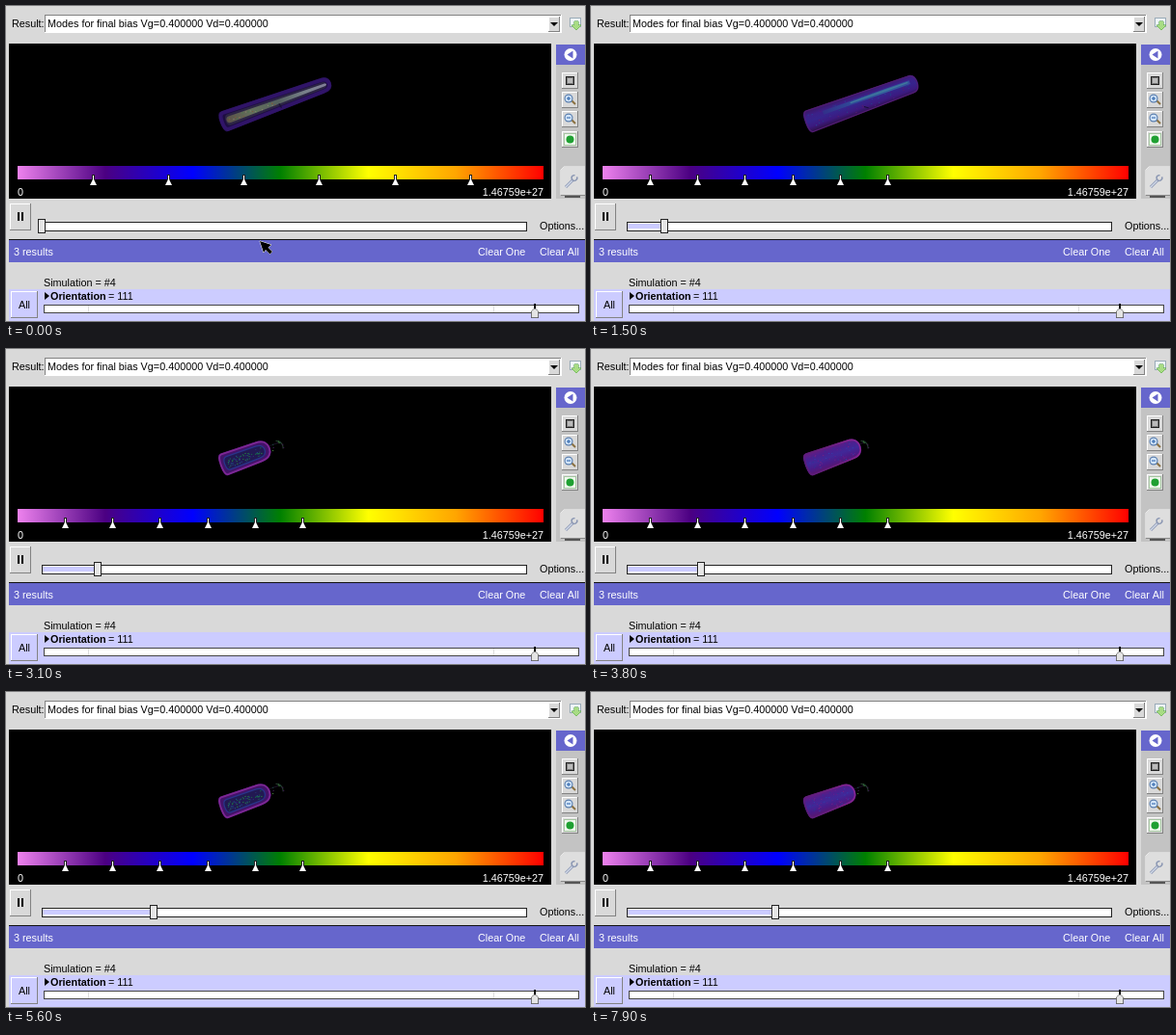
Animation of 600x327 px, one loop 8000 ms. Source, as an HTML page with a canvas:

```html
<!DOCTYPE html>
<html lang="en">
<head>
<meta charset="utf-8">
<title>Simulation viewer</title>
<style>
html, body { margin: 0; width: 100%; height: 100%; overflow: hidden; background: #d9d9d9; }
canvas { display: block; width: 600px; height: 327px; }
</style>
</head>
<body>
<canvas id="stage" width="600" height="327"></canvas>
<script>
const c = document.getElementById('stage').getContext('2d');
const LOOP = 8000;
const GREY = '#d9d9d9', BLUE = '#6666cc', PALE = '#ccccff';
const RAINBOW = ['#ee82ee', '#4b0082', '#0000ff', '#008000', '#ffff00', '#ffa500', '#ff0000'];

// Playback steps: start time, slider position, volume look, volume length
const STEPS = [
  [0, 36, 'glow', 121], [100, 36, 'tube', 123], [800, 55, 'tube', 123], [1500, 75, 'tube', 123],
  [2500, 94, 'ring', 54], [3300, 113, 'solid', 60], [4300, 133, 'tube', 123],
  [5300, 152, 'ring', 54], [6300, 172, 'ring', 54], [7200, 190, 'solid', 54]
];

function rect(x, y, w, h, fill) {
  c.fillStyle = fill;
  c.fillRect(x, y, w, h);
}

function frame(x, y, w, h, line) {
  c.strokeStyle = line;
  c.lineWidth = 1;
  c.strokeRect(x + .5, y + .5, w - 1, h - 1);
}

function box(x, y, w, h, fill, line) {
  rect(x, y, w, h, fill);
  frame(x, y, w, h, line);
}

function raised(x, y, w, h, fill = GREY) {
  rect(x, y, w, h, '#828282');
  rect(x, y, w - 1, h - 1, '#fff');
  rect(x + 1, y + 1, w - 2, h - 2, fill);
}

function poly(points, fill, line) {
  c.beginPath();
  for (let i = 0; i < points.length; i += 2) c.lineTo(points[i], points[i + 1]);
  c.closePath();
  if (line) { c.strokeStyle = line; c.lineWidth = 1; c.stroke(); }
  c.fillStyle = fill;
  c.fill();
}

function disc(x, y, r, fill) {
  c.beginPath();
  c.arc(x, y, r, 0, 7);
  c.fillStyle = fill;
  c.fill();
}

function line(x1, y1, x2, y2, color, width = 1) {
  c.beginPath();
  c.moveTo(x1, y1);
  c.lineTo(x2, y2);
  c.strokeStyle = color;
  c.lineWidth = width;
  c.stroke();
}

function text(s, x, y, color = '#000', align = 'left', weight = '') {
  c.font = weight + ' 10.8px "Liberation Sans", Arial, sans-serif';
  c.textAlign = align;
  c.fillStyle = color;
  c.fillText(s, x, y);
}

function ramp(x1, y1, x2, y2, colors) {
  const g = c.createLinearGradient(x1, y1, x2, y2);
  colors.forEach((col, i) => g.addColorStop(i / (colors.length - 1), col));
  return g;
}

function random(seed) {
  return () => (seed = seed * 16807 % 2147483647) / 2147483647;
}

function specks(n, seed, x, w, h, colors) {
  const rnd = random(seed);
  for (let i = 0; i < n; i++) {
    rect(x + rnd() * w, (rnd() - .5) * h, 1.3, 1, colors[i % colors.length]);
  }
}

// Rod along the local x axis; a is the left and b the right half-width
function rod(x, len, a, b, nose) {
  c.beginPath();
  c.moveTo(x + 3, -a);
  c.lineTo(len - nose, -b);
  c.bezierCurveTo(len - nose / 4, -b, len, -b / 2, len, 0);
  c.bezierCurveTo(len, b / 2, len - nose / 4, b, len - nose, b);
  c.lineTo(x + 3, a);
  c.quadraticCurveTo(x - 1, a, x - 1, 0);
  c.quadraticCurveTo(x - 1, -a, x + 3, -a);
  c.closePath();
}

function fillRod(fill, ...shape) {
  rod(...shape);
  c.fillStyle = fill;
  c.fill();
}

function strokeRod(color, width, ...shape) {
  rod(...shape);
  c.strokeStyle = color;
  c.lineWidth = width;
  c.stroke();
}

// Faint remains of the far end beside the short body
function farEnd() {
  line(54, -2, 64, -2, '#1c1026');
  c.beginPath();
  c.arc(60, 2, 7, -1.3, .5);
  c.strokeStyle = '#263a2c';
  c.lineWidth = 1.2;
  c.stroke();
  specks(9, 37, 55, 12, 9, ['#3f7a35', '#3a1a50', '#174a3c']);
}

const LOOKS = {
  glow(len) {
    fillRod('#1d0d42', 0, len, 11, 8, 8);
    strokeRod('#301468', 4, 2, len - 2, 9, 6, 8);
    fillRod('#2d2546', 6, len - 5, 6, 3.5, 5);
    fillRod(ramp(5, 0, len, 0, ['#5a5048', '#64705c', '#55615f', '#78808a', '#857f9c']), 7, len - 5, 3.5, 1.3, 3);
    specks(26, 11, 8, 50, 5, ['#7c5a3c', '#4b7a50', '#8a8470']);
    line(63, 2, 64, 7, '#1a1030');
  },
  tube(len) {
    fillRod(ramp(0, -11, 0, 11, ['#3c1868', '#3c2088', '#36248c', '#3c1a80', '#30104c']), 0, len, 12, 9.5, 7);
    strokeRod('#541d74', 1, 1, len - 1, 11.3, 9, 7);
    specks(60, 23, 4, len - 14, 15, ['#2a4098', '#4c1b80', '#283c88', '#5a1c6c']);
    line(20, -3.5, len - 8, -2.5, ramp(20, 0, len, 0, ['#32308a', '#2f4c98', '#34629c', '#35489c']), 4);
    line(50, -3.5, len - 10, -3, '#407a9c', 1.2);
    line(62, 5, 66, 8, '#171032');
  },
  solid(len) {
    farEnd();
    fillRod(ramp(0, -11, 0, 11, ['#641b80', '#4a2090', '#402898', '#4a1b88', '#5a1670']), 0, len, 12, 10.5, 11);
    strokeRod(ramp(0, 0, len, 0, ['#5c1c78', '#6b217f', '#8a2494']), 1.6, 1, len - 1, 11.3, 9.7, 11);
    specks(50, 41, 4, len - 12, 17, ['#353ca8', '#641d8c', '#303494', '#722286']);
  },
  ring(len) {
    farEnd();
    fillRod('#431369', 0, len, 12, 11, 12);
    strokeRod('#7d2794', 1.8, 1, len - 1, 11, 10, 12);
    fillRod('#221952', 5, len - 6, 7, 6.5, 8);
    strokeRod('#28358a', 1.3, 5, len - 6, 7, 6.5, 8);
    specks(65, 53, 7, len - 16, 9, ['#19694a', '#205086', '#248044', '#283070']);
  }
};

function volume(t, i) {
  const [start, , look, len] = STEPS[i];
  const [, , oldLook, oldLen] = STEPS[Math.max(0, i - 1)];
  const same = look === oldLook && len === oldLen;
  const mix = same ? 1 : Math.min(1, (t - start + 100) / 400);
  c.save();
  c.beginPath();
  c.rect(4, 40, 561, 125);
  c.clip();
  c.translate(223, 121);
  c.rotate(-.35);
  if (mix < 1) {
    c.globalAlpha = 1 - mix;
    LOOKS[oldLook](oldLen);
  }
  c.globalAlpha = mix;
  LOOKS[look](len);
  c.restore();
}

function legend(t) {
  rect(12, 166, 545, 14, ramp(12, 0, 557, 0, RAINBOW));
  const gap = t < 300 ? 78.2 : 49.3;
  for (let i = 1; i < 7; i++) {
    const x = Math.floor(12 + i * gap);
    rect(x - 1, 175, 3, 6, '#222');
    rect(x, 176, 1, 6, '#fff');
    poly([x + .5, 179, x + 4, 186, x - 3, 186], '#fff');
  }
  text('0', 12, 197, '#fff');
  text('1.46759e+27', 557, 197, '#fff', 'right');
}

function topBar() {
  text('Result:', 6, 22);
  rect(40, 9, 536, 19, '#fff');
  rect(40, 9, 535, 1, '#828282');
  rect(40, 9, 1, 18, '#828282');
  raised(562, 11, 12, 16);
  poly([564, 17, 572, 17, 568, 21], '#000');
  text('Modes for final bias Vg=0.400000 Vd=0.400000', 43, 22);
  box(584, 12, 12, 10, '#eef4f8', '#9aabb8');
  poly([589, 16, 593, 16, 593, 20, 596, 20, 591, 25, 586, 20, 589, 20], '#a8dc84', '#4a9a3a');
}

function magnifier(y, plus) {
  raised(576, y - 8, 17, 17);
  line(586, y + 1, 590, y + 5, '#8a7040', 2);
  disc(583, y - 1, 4.5, '#5c80b0');
  disc(583, y - 1, 3.3, '#d4e6fa');
  rect(581, y - 1.5, 4, 1, '#2860a8');
  if (plus) rect(582.5, y - 3, 1, 4, '#2860a8');
}

function sideBar() {
  rect(570, 61, 30, 139, '#c3c3c3');
  rect(570, 40, 30, 21, BLUE);
  disc(585, 50.5, 6.5, '#fff');
  poly([587.5, 46.5, 587.5, 54.5, 581.5, 50.5], BLUE);
  raised(576, 69, 17, 17);
  box(580, 73, 9, 9, '#bbb', '#222');
  frame(581, 74, 7, 7, '#777');
  magnifier(97, true);
  magnifier(117, false);
  raised(576, 130, 17, 17);
  box(578, 132, 13, 13, '#f0f8ee', '#a8c8a4');
  disc(584.5, 138.5, 4, '#1fa032');
  poly([575, 196, 575, 170, 578, 167, 600, 167, 600, 196], '#dedede', '#f4f4f4');
  line(580, 188, 587, 181, '#8c98b4', 3);
  line(580, 188, 587, 181, '#d4dcea', 1.2);
  c.beginPath();
  c.arc(589, 178.5, 2.8, -.4, 4.9);
  c.strokeStyle = '#8c98b4';
  c.lineWidth = 1.5;
  c.stroke();
  rect(575, 196, 25, 1, '#888');
  rect(579, 197, 16, 2, '#555');
}

function player(x) {
  raised(4, 205, 22, 28);
  rect(12, 214, 2, 9, '#000');
  rect(16, 214, 2, 9, '#000');
  box(37, 224, 503, 10, '#fff', '#222');
  if (x > 40) rect(38, 226, x - 38, 5, PALE);
  box(x - 3, 221, 8, 15, '#e6e6e6', '#222');
  rect(x - 2, 222, 1, 13, '#fff');
  text('Options...', 553, 232);
}

function results(t) {
  rect(3, 242, 597, 1, '#111');
  rect(3, 243, 597, 23, BLUE);
  text('3 results', 8, 259, '#fff');
  text('Clear One', 489, 259, '#fff');
  const hover = t >= 500 && t < 1000;
  if (hover) raised(549, 246, 48, 18, '#ececec');
  text('Clear All', 553, 259, hover ? '#000' : '#fff');
}

function parameters() {
  text('Simulation = #4', 39, 291);
  rect(34, 294, 566, 33, PALE);
  rect(3, 294, 31, 33, PALE);
  raised(5, 296, 28, 28, PALE);
  text('All', 19, 314, '#000', 'center');
  poly([40, 297, 45, 301, 40, 305], '#000');
  text('Orientation', 46, 305, '#000', 'left', 'bold');
  text('= 111', 106, 305);
  box(39, 310, 555, 9, '#fff', '#444');
  rect(85, 311, 1, 7, '#ddd');
  rect(505, 311, 1, 7, '#ddd');
  rect(547, 309, 2, 7, '#000');
  poly([548, 314, 551.5, 317, 551.5, 323.5, 544.5, 323.5, 544.5, 317], '#e4e4e4', '#000');
}

function pointer(t) {
  if (t >= 800) return;
  const a = Math.max(0, Math.min(1, (t - 100) / 400));
  const b = Math.max(0, Math.min(1, (t - 500) / 200));
  const ease = a * a * (3 - 2 * a);
  c.save();
  c.translate(263 + 303 * ease + 28 * b, 244 + 10 * ease + 48 * b);
  poly([0, 0, 12, 4, 8.5, 6.5, 13, 11, 10.5, 13.5, 6, 9, 4, 12], '#000', '#fff');
  c.restore();
}

function draw(now) {
  const t = Math.floor(now % LOOP / 100) * 100;
  let i = STEPS.length - 1;
  while (STEPS[i][0] > t) i--;
  rect(0, 0, 600, 327, GREY);
  topBar();
  rect(3, 39, 562, 161, '#000');
  volume(t, i);
  legend(t);
  sideBar();
  player(STEPS[i][1]);
  results(t);
  parameters();
  pointer(t);
}

let begin;
function tick(now) {
  begin ??= now;
  draw(now - begin);
  requestAnimationFrame(tick);
}
draw(0);
requestAnimationFrame(tick);
</script>
</body>
</html>
```
